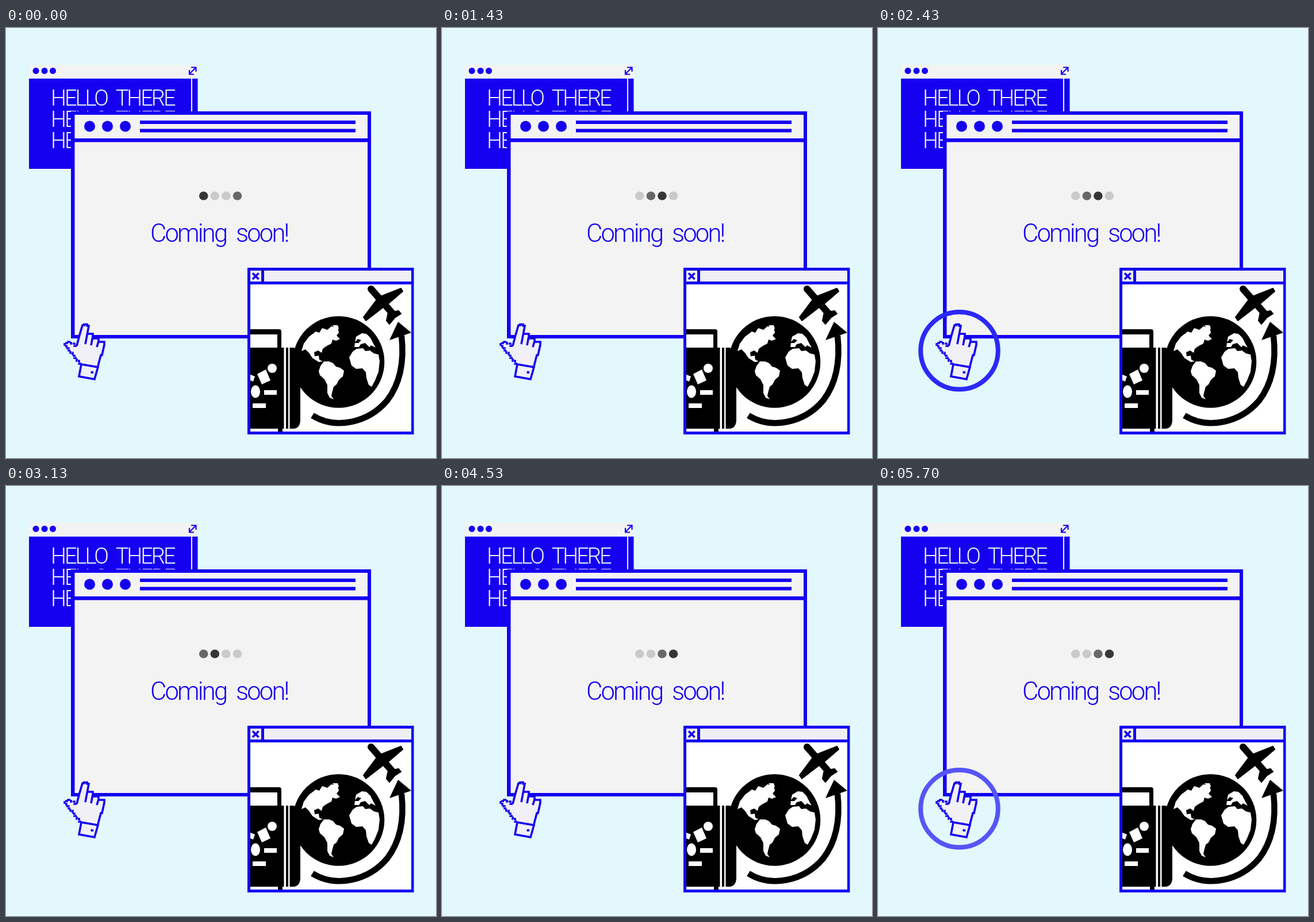
Animation of 748 by 748 pixels, one loop 5730 ms. Source, as an HTML page:

```html
<!DOCTYPE html>
<html lang="en">
<head>
<meta charset="utf-8">
<title>Coming soon</title>
<style>
html, body { margin: 0; width: 100%; height: 100%; overflow: hidden; background: #e2f8fc; }
svg { display: block; width: 100vw; height: 100vh; }
text { font-family: Roboto, "Open Sans", sans-serif; font-weight: 300; }
.hello { font-size: 38px; letter-spacing: -3px; word-spacing: 9px; fill: #f3f3f3; }
.soon { font-size: 43.5px; letter-spacing: -2.8px; word-spacing: 9px; }
.blue { fill: #1500f0; }
.line { fill: none; stroke: #1500f0; }
.pale { fill: #f3f3f3; }
.white { fill: #fff; }
</style>
</head>
<body>
<svg viewBox="0 0 748 748">
  <!-- back window -->
  <rect class="pale" x="40" y="64" width="293.5" height="183"/>
  <rect class="blue" x="40" y="88" width="293.5" height="157"/>
  <g class="blue"><circle cx="52" cy="74.5" r="5.5"/><circle cx="67" cy="74.5" r="5.5"/><circle cx="81.5" cy="74.5" r="5.5"/></g>
  <path class="line" stroke-width="2.2" d="M319 80L330 69M322 68.5H330.5V76M319 73V80.5H327"/>
  <path stroke="#f3f3f3" stroke-width="2" d="M323 88V146"/>
  <g class="hello">
    <text x="78" y="135">HELLO THERE</text>
    <text x="78" y="172">HELLO THERE</text>
    <text x="78" y="208.5">HELLO THERE</text>
  </g>

  <!-- main window -->
  <path class="blue" d="M113 145H635V540H113Z"/>
  <path class="pale" d="M119.500 151H629V192H119.500ZM119.500 198.500H629V534H119.500Z"/>
  <g class="blue"><circle cx="145.5" cy="171" r="9.5"/><circle cx="176.5" cy="171" r="9.5"/><circle cx="207.5" cy="171" r="9.5"/></g>
  <path class="line" stroke-width="6" d="M233 164H608M233 178.5H608"/>
  <g id="dots"></g>
  <text class="soon blue" x="251" y="372">Coming soon!</text>

  <!-- travel window -->
  <path class="blue" d="M420 417H709.500V707H420Z"/>
  <path fill="#f0f0f4" d="M425 422H444V441H425ZM449 422H705V441H449Z"/>
  <path class="white" d="M425 446H705V702H425Z"/>
  <path class="line" stroke-width="3.6" d="M429 426.500L439.500 437M439.500 426.500L429 437"/>

  <circle cx="578.5" cy="581" r="79.8"/>
  <g class="white">
    <path d="M514 562L518 549 527 537 539 528 545 530 550 522 559 525 566 519 577 521 579 530 575 535 581 541 574 544 568 542 566 549 558 553 551 558 549 565 543 561 536 564 537 571 544 570 545 577 551 580 544 581 533 574 527 565 521 559Z"/>
    <path d="M547 588L553 580 562 580 569 583 574 589 581 591 588 596 586 606 579 612 575 620 570 624 567 635 566 640 570 646 563 643 559 635 559 621 554 611 546 604 544 597Z"/>
    <path d="M606 555L607 548 613 548 618 543 612 541 607 546 609 537 619 531 627 532 634 539 639 549 643 556 635 552 632 555 625 548 617 550 614 555Z"/>
    <path d="M597 573L603 563 610 558 621 557 625 562 633 561 640 566 648 568 650 580 648 598 642 613 636 624 631 621 627 609 626 599 620 592 609 593 601 587Z"/>
    <path d="M568 517L577 517 579 523 574 525Z"/>
  </g>

  <path fill="none" stroke="#000" stroke-width="10.500" d="M533 674C573 699 630 687 663 648Q696 605 688 535"/>
  <path d="M682 511L705 530 667 543Z"/>
  <path stroke="#000" stroke-width="12" stroke-linecap="round" d="M635 454L671 495"/>
  <path stroke="#000" stroke-width="2" stroke-linejoin="round" d="M649 468L687 453 690 458 661 483ZM646 471L622 503 626 509 661 482ZM666 490L662 509 667 515 677 503ZM672 494L683 492 687 497 676 504Z"/>

  <path d="M425 524H475Q479 524 479 528V556H499Q512 557 512 572V683Q511 697 499 697H481V702H473V697H425V556H472V533H425Z"/>
  <path class="white" d="M483.500 556H487V697H483.500ZM491 556H493.500V697H491Z"/>
  <g class="white">
    <ellipse cx="434" cy="632.5" rx="8" ry="11"/><circle cx="463" cy="592" r="8"/>
    <path d="M437 602L452 594 460 613 445 620ZM425 603L433 606 430 615 425 613ZM449 630H471V638H449ZM429 653H452V661H429Z"/>
  </g>

  <!-- pointer -->
  <g fill="#f0f0f6" stroke="#1500f0" stroke-width="3.6">
    <path stroke="none" d="M132 517L143 518 141 533 151 532 151 539 161 540 161 546 171 547 166 570 159 589 130 584 120 574 111 564 102 553 102 547 111 546 123 553Z"/>
    <path fill="none" d="M123 553L128 534 133 517H136V515.500H141V518H144L138 550M142 532H151V536L148 552M152 540H161V545L158 555M162 546H171V551L167 569H165L160 588"/>
    <path fill="none" stroke-dasharray="5 1" d="M123 553H119V549H113V546H108V548H102V553H105V557H109V561H112V565H116V570H119V574H123V579H127V584H131"/>
    <path d="M131 585L160 590 154 611 127 606Z"/>
    <path stroke="none" class="blue" d="M147.500 597H152V601H147.500Z"/>
  </g>
  <circle id="ring" cx="141.500" cy="561.300" r="67.300" fill="none" stroke-width="8"/>
</svg>
<script>
const LOOP = 5730, STEP = LOOP / 24, BEAT = LOOP / 16, LEAD = 15;
const RING = ["none", "#5654f6", "#2c28f6", "#5654f6"];
const SHADES = ["#363638", "#686868", "#cacacc", "#cacacc"];
const ring = document.getElementById("ring");
const dots = [0, 1, 2, 3].map(i => {
  const dot = document.createElementNS("http://www.w3.org/2000/svg", "ellipse");
  const shape = { cx: 343.7 + i * 19.6, cy: 292, rx: 7.8, ry: 7.6 };
  for (const key in shape) dot.setAttribute(key, shape[key]);
  return document.getElementById("dots").appendChild(dot);
});

function draw(now) {
  const t = now % LOOP + LEAD;
  const head = Math.floor(t / STEP) % 4;
  // The dark dot leads and a grey one trails it.
  dots.forEach((dot, i) => dot.setAttribute("fill", SHADES[(head - i + 4) % 4]));
  ring.setAttribute("stroke", RING[Math.floor(t / BEAT) % 4]);
}

const start = performance.now();
function tick() {
  draw(performance.now() - start);
  requestAnimationFrame(tick);
}
tick();
</script>
</body>
</html>
```
